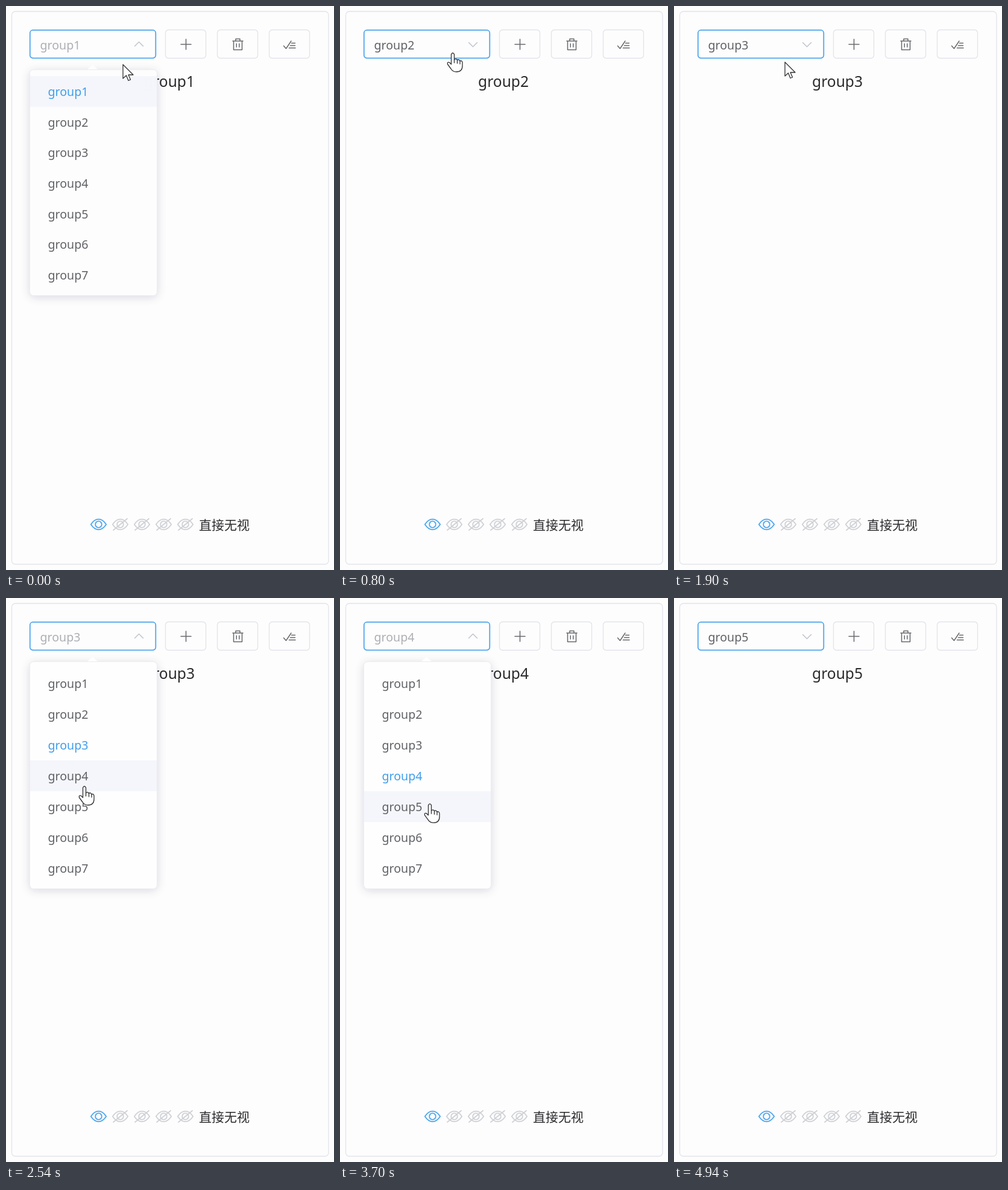
These frames come from a looping animation (544 by 934 pixels, 5 s). An HTML page:

```html
<!DOCTYPE html>
<html lang="zh">
<head>
<meta charset="utf-8">
<style>
  html, body { margin: 0; width: 100%; height: 100%; overflow: hidden; background: #fdfdfd; }
  svg { display: block; width: 544px; height: 934px; fill: none; stroke-linecap: round; stroke-linejoin: round; }
  text { font: 19.6px "Noto Sans", "Open Sans", sans-serif; fill: #606266; }
  #title { font-size: 24.6px; fill: #2b2b2e; }
  .rate { font: 21px "Noto Sans CJK SC", "Noto Sans CJK", sans-serif; fill: #2b2b2e; }
  .line { stroke: #e2e4ea; stroke-width: 1.3; }
  .icon { stroke: #66686c; stroke-width: 1.5; }
  .blue { stroke: #4fa6ee; stroke-width: 1.8; }
  .off { stroke: #cfd1d6; stroke-width: 1.8; }
  #cursor path { fill: #fefefe; stroke: #303034; stroke-width: 1.3; }
</style>
</head>
<body>
<svg viewBox="0 0 544 934">
  <defs>
    <filter id="glow" x="-20%" y="-20%" width="140%" height="140%"><feGaussianBlur stdDeviation="8"/></filter>
    <g id="eye"><path d="M-12.7 0Q-7-8.6 0-8.6T12.7 0Q7 8.6 0 8.6T-12.7 0Z"/><circle r="5.3"/></g>
    <g id="noeye"><use href="#eye"/><path d="M11.5-9.5L-11.5 9.5"/></g>
  </defs>

  <rect class="line" x="9.5" y="9" width="525.5" height="915.5" rx="6"/>
  <rect class="blue" x="39.8" y="39.8" width="208.5" height="46.5" rx="5"/>
  <text id="value" x="56.5" y="72"></text>
  <path id="chevron" d="M-7-3L0 4L7-3" stroke="#c0c4cc" stroke-width="1.5"/>

  <g class="line">
    <rect x="264.5" y="39.5" width="67" height="47" rx="5"/>
    <rect x="350.5" y="39.5" width="67" height="47" rx="5"/>
    <rect x="436.5" y="39.5" width="67" height="47" rx="5"/>
  </g>
  <g class="icon">
    <path d="M290 63.5H307M298.5 55V72"/>
    <path d="M376 58H393M381 58V54.5H388V58M377.5 58V72.5H391.5V58M382.3 62.5V68M386.8 62.5V68"/>
    <path d="M460.5 66L464.5 70.5L473 58M473.5 61.5H479.5M471.5 65.5H479.5M469.5 69.5H480"/>
  </g>

  <text id="title" x="229" y="134"></text>

  <g id="rate"><text class="rate" x="320" y="867">直接无视</text></g>

  <g id="menu">
    <rect x="39.5" y="108" width="211" height="376" rx="6" fill="#20205c" opacity=".17" filter="url(#glow)"/>
    <path d="M134 106L143.5 97L153 106Z" fill="#fefefe"/>
    <rect x="39.5" y="105.5" width="211" height="376" rx="6" fill="#fefefe" stroke="#ececf2"/>
    <rect id="hover" x="40" width="210" height="51" fill="#f4f6fb"/>
  </g>
  <g id="cursor"><path id="arrow" d="M0 0V23L5.5 18L9 26.5L12.5 25L9 17H17Z"/>
    <g id="hand">
      <path d="M-2.5 2Q0-2.5 2.5 2V11Q5 8 7.5 11.5Q10 9.5 12 13Q15 11.5 16 15.5V21Q16 31 6 31Q0 31-3 26L-8.5 18.5Q-9.5 14-5.5 15.5L-2.5 18.5Z"/>
      <path d="M2.5 11V16M7.5 11.5V17M12 13V18"/>
    </g>
  </g>
</svg>
<script>
const LOOP = 5000, TOP = 105, FIRST = 116, ROW = 51;
const opens = [-195, 960, 2100, 3297], closes = [420, 1400, 2660, 3800];
// Pointer stops: time, x, y
const stops = [
  [0, 194, 97], [300, 150, 192], [500, 150, 196], [800, 187, 78], [900, 190, 67], [1040, 190, 67],
  [1330, 146, 245], [1500, 146, 247], [1900, 184, 93], [2000, 190, 68], [2180, 190, 68],
  [2500, 130, 310], [2540, 130, 312], [2740, 130, 312], [3160, 193, 66], [3360, 194, 64],
  [3650, 149, 341], [3840, 149, 342], [4120, -30, 380]
];

const $ = id => document.getElementById(id);
const add = (parent, tag, attrs) => {
  const el = document.createElementNS("http://www.w3.org/2000/svg", tag);
  for (const key in attrs) el.setAttribute(key, attrs[key]);
  return parent.appendChild(el);
};
const clamp = v => Math.min(1, Math.max(0, v));
const outQuint = p => 1 - (1 - p) ** 5;
const smooth = p => p * p * (3 - 2 * p);
const show = (el, on) => el.setAttribute("visibility", on ? "visible" : "hidden");
const rowY = i => FIRST + ROW * i;

const items = Array.from({ length: 7 }, (_, i) => {
  const el = add($("menu"), "text", { x: 69.5, y: rowY(i) + 33 });
  el.textContent = "group" + (i + 1);
  return el;
});
for (let i = 0; i < 5; i++) add($("rate"), "use", {
  href: i ? "#noeye" : "#eye", class: i ? "off" : "blue", x: 153.5 + 36 * i, y: 858.5
});

function pointer(t) {
  const i = stops.findIndex(s => s[0] > t);
  if (i < 0) return null;
  const [t0, x0, y0] = stops[i - 1], [t1, x1, y1] = stops[i];
  const p = smooth((t - t0) / (t1 - t0));
  return [x0 + (x1 - x0) * p, y0 + (y1 - y0) * p];
}

function draw(t) {
  const picked = closes.filter(c => c <= t).length;
  const openedAt = opens.filter(o => o <= t).pop();
  const closedAt = closes[picked - 1] ?? -1000;
  const open = openedAt > closedAt;
  const age = t - Math.max(openedAt, closedAt);
  const grow = outQuint(clamp(age / 300)), spin = smooth(clamp(age / 195));
  const shown = open ? grow : 1 - grow;
  const turn = open ? spin : 1 - spin;
  const name = "group" + (picked + 1);

  $("title").textContent = $("value").textContent = name;
  $("value").style.fill = open ? "#adafb4" : "";
  $("chevron").setAttribute("transform", `translate(220.5 63.5) rotate(${180 * turn})`);

  const at = pointer(t);
  const row = at ? Math.floor((at[1] - FIRST) / ROW) : -1;
  const onRow = open && row >= 0 && row < items.length;
  const onSelect = at && at[1] > 39 && at[1] < 87;
  $("hover").setAttribute("y", rowY(onRow ? row : picked));
  items.forEach((el, i) => el.style.fill = i === picked ? "#409eec" : "");
  $("menu").setAttribute("transform", `translate(0 ${TOP * (1 - shown)}) scale(1 ${shown})`);
  $("menu").setAttribute("opacity", shown);
  show($("menu"), shown > 0);

  const hand = onRow || onSelect;
  show($("hand"), at && hand);
  show($("arrow"), at && !hand);
  if (at) $("cursor").setAttribute("transform", `translate(${at})`);
}

function tick() {
  draw(performance.now() % LOOP);
  requestAnimationFrame(tick);
}
tick();
</script>
</body>
</html>
```
